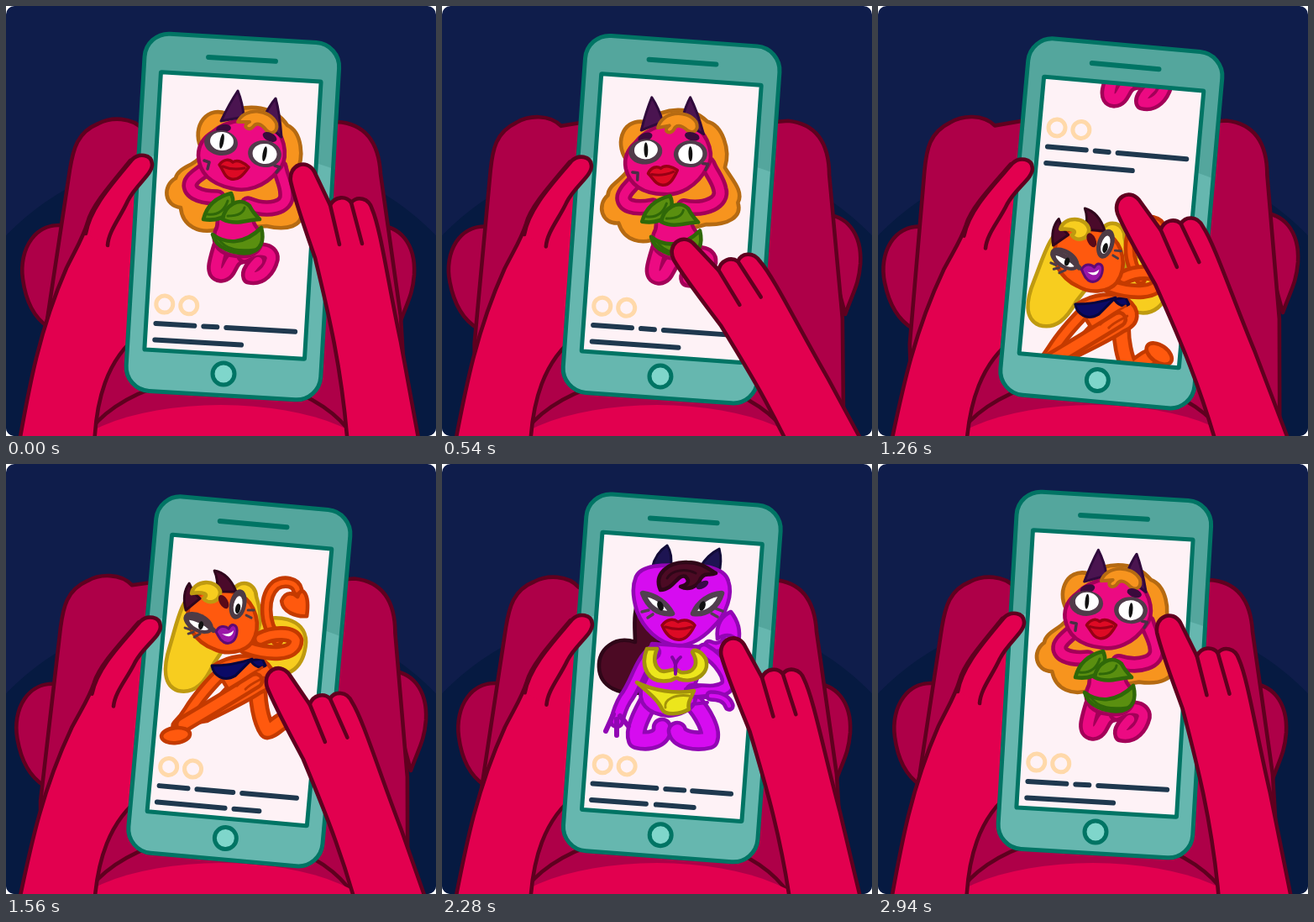
Write an HTML page with a canvas that moves like this. It is 512 px wide and 512 px high and loops after 3000 ms.

```html
<!DOCTYPE html>
<html>
<head>
<meta charset="utf-8">
<style>
html, body { margin: 0; width: 100%; height: 100%; overflow: hidden; background: #fff }
canvas { display: block }
</style>
</head>
<body>
<canvas id="stage" width="512" height="512"></canvas>
<script>
const c = document.getElementById('stage').getContext('2d');
const LOOP = 3000, PITCH = 332, TILT = 3.4;
const SKIN = '#e2004f', LEG = '#ae0048', INK = '#5f001f', TEAL = '#007464';

// drawing helpers
function shape(d, fill, line, w = 4.6) {
  const p = new Path2D(d);
  if (fill) { c.fillStyle = fill; c.fill(p); }
  if (line) { c.strokeStyle = line; c.lineWidth = w; c.stroke(p); }
}
function limb(d, w, fill, line) {
  shape(d, null, line, w + 4.6);
  shape(d, null, fill, w - 4.6);
}
function oval(x, y, rx, ry, rot, fill, line, w = 4.6) {
  c.beginPath();
  c.ellipse(x, y, rx, ry, rot * Math.PI / 180, 0, 7);
  if (fill) { c.fillStyle = fill; c.fill(); }
  if (line) { c.strokeStyle = line; c.lineWidth = w; c.stroke(); }
}
function box(x, y, w, h, r, fill, line, lw) {
  c.beginPath();
  c.roundRect(x, y, w, h, r);
  if (fill) { c.fillStyle = fill; c.fill(); }
  if (line) { c.strokeStyle = line; c.lineWidth = lw; c.stroke(); }
}
function turn(deg, x, y) {
  c.translate(x, y);
  c.rotate(deg * Math.PI / 180);
  c.translate(-x, -y);
}
function group(draw) { c.save(); draw(); c.restore(); }

// timing helpers
const ramp = (t, a, b) => {
  const k = Math.min(1, Math.max(0, (t - a) / (b - a)));
  return k * k * (3 - 2 * k);
};
const sway = t => Math.sin(2 * Math.PI * (t - 950) / 1000);

// time, turn, fingertip x, fingertip y
const HAND = [
  [0, 0, 352, 198], [540, -18, 285, 288], [960, -20, 268, 298], [1200, -12, 285, 240],
  [1400, -5, 335, 215], [1560, -9, 322, 253], [1760, -19, 270, 298], [1980, -14, 272, 235],
  [2130, -7, 318, 200], [2280, -3, 345, 217], [2500, -18, 285, 288], [2630, -18, 270, 288],
  [2790, -10, 290, 232], [2940, -1, 345, 190], [3000, 0, 352, 198]
];
function handAt(t) {
  const i = HAND.findIndex(k => k[0] > t), a = HAND[i - 1], b = HAND[i];
  const k = ramp(t, a[0], b[0]);
  return a.map((v, n) => v + (b[n] - v) * k);
}

function pinkGirl(t) {
  const P = '#ec0a82', D = '#a30058', H = '#f7941e', HD = '#b56a12', G = '#5a8f10', GD = '#2f6808';
  const head = draw => group(() => { turn(14 * sway(t) - 4.4, 284, 252); draw(); });
  head(() => shape('M262 128C235 118 220 150 234 172C232 190 205 190 202 205C186 214 188 238 208 240C210 262 230 272 252 266L310 262C335 268 354 262 352 244C362 232 350 215 345 200C356 180 352 150 335 142C320 120 290 115 262 128Z', H, HD));
  limb('M256 286C250 306 246 318 256 319C268 318 264 300 280 297', 17, P, D);
  limb('M284 297C300 288 317 290 316 301C313 313 304 325 290 322C288 317 294 310 300 304', 15, P, D);
  shape('M248 236L298 240C290 255 296 262 304 270C308 290 296 300 275 298C255 296 244 285 249 268C255 258 250 248 248 236Z', P, D);
  shape('M246 272C262 284 284 284 304 264C308 280 304 290 290 294C270 296 250 288 246 272Z', G, GD);
  shape('M252 276C262 292 280 292 296 290', null, GD, 3);
  head(() => {
    limb('M252 228C228 228 216 220 220 210C224 202 232 200 240 192', 15, P, D);
    limb('M288 236C312 246 336 240 334 224C334 212 328 204 326 192', 15, P, D);
    shape('M246 150C262 136 300 128 320 145C334 160 336 185 324 196C308 216 285 222 268 217C245 212 230 200 229 178C229 165 236 156 246 150Z', P, D);
    shape('M256 137Q266 116 276 101Q282 116 283 132Z', '#4a1450', '#30093c', 3);
    shape('M305 136Q314 118 321 110Q326 128 328 156Z', '#4a1450', '#30093c', 3);
    shape('M276 138C284 120 314 122 322 140C324 150 316 154 310 148C304 140 298 138 294 144C288 150 280 142 290 138Z', H, HD, 4);
    oval(259, 146, 9, 5, -10, '#3a0a3c');
    oval(314, 156, 9, 5, 25, '#3a0a3c');
    shape('M236 184L242 186L240 194M320 190L326 192L322 198', null, '#4a2d45', 3.5);
    oval(256, 163, 20, 15, 6, '#503b4a');
    oval(308, 176, 20, 16, 8, '#503b4a');
    oval(257, 161, 14, 11, 6, '#fff');
    oval(308, 176, 14.5, 12, 8, '#fff');
    oval(257, 161, 2.4, 9, 10, '#111');
    oval(308, 176, 2.4, 9, 10, '#111');
    shape('M254 189C259 182 266 182 270 186C276 182 284 187 289 192C282 202 276 208 268 206C260 204 259 196 254 189Z', '#dd0a24', '#970014', 3.5);
    shape('M258 191Q270 196 284 193', null, '#970014', 3);
  });
  shape('M235 254C240 234 256 226 268 223C276 240 262 258 235 254Z', G, GD);
  shape('M258 254C260 238 278 226 290 238C294 246 298 250 302 254C288 254 274 262 258 254Z', G, GD);
  shape('M240 248Q258 250 264 232M264 250Q282 250 284 240', null, GD, 3);
  // tinted bubble over the picture
  const grow = ramp(t, 640, 900), fade = 1 - ramp(t, 1020, 1160);
  if (grow && fade) {
    c.globalAlpha = .55 * fade;
    oval(274, 205, 76 * grow, 62 * grow, 0, '#4aa8e8');
    c.globalAlpha = 1;
  }
}

function orangeGirl(t) {
  const P = '#ff590e', D = '#c43a00', H = '#f7cd1f', HD = '#bf9a10', N = '#0b0a66';
  turn(-1.7, 10, 520);
  c.translate(1, 2);
  const head = draw => group(() => { turn(3 * (sway(t) + .64), 265, 228); draw(); });
  shape('M296 186C318 176 356 180 356 210C354 240 336 254 312 246C296 240 290 220 296 186Z', H, HD);
  head(() => {
    shape('M228 142C206 160 202 190 194 215C186 240 186 262 204 268C224 272 236 258 246 236L270 200Z', H, HD);
    shape('M268 150C276 134 296 138 297 156C302 172 306 190 292 208Z', H, HD);
  });
  limb('M322 208C304 186 306 154 320 142C330 136 344 138 346 148', 10, P, D);
  shape('M327 161C332 148 342 152 346 156C350 142 361 150 357 179C344 180 328 174 327 161Z', P, D);
  limb('M300 250C296 280 304 306 310 315C316 315 324 304 336 300', 18, P, D);
  oval(344, 297, 17, 10, 35, P, D);
  shape('M246 238C264 226 290 222 306 232C322 244 322 262 302 270C284 282 262 292 238 304L226 306C240 290 250 276 262 264Z', P, D);
  limb('M258 244C244 258 228 276 218 292C212 302 208 306 204 310', 13, P, D);
  limb('M296 256C270 272 244 288 210 308', 16, P, D);
  oval(201, 321, 17, 9, -6, P, D);
  shape('M244 238C246 250 258 258 272 250C278 244 284 238 292 230C280 234 266 238 244 238Z', N, '#06063f', 3);
  shape('M290 232C296 240 302 242 308 238L304 230Z', N, '#06063f', 3);
  limb('M284 216C312 226 344 226 344 208C340 198 318 198 302 206', 14, P, D);
  shape('M274 262C284 250 296 246 304 240M284 266C292 258 300 256 306 252', null, D, 3);
  head(() => {
    shape('M216 170C222 148 252 142 278 154C296 164 304 190 292 210C284 222 262 226 246 218C224 210 212 190 216 170Z', P, D);
    shape('M213 172Q208 152 217 140Q222 152 230 158Z', '#4a0a2a', '#30061c', 3);
    shape('M250 150Q252 136 247 125Q264 128 273 150Z', '#4a0a2a', '#30061c', 3);
    shape('M220 152C222 136 250 134 254 150C254 162 240 166 234 158C242 152 232 150 220 152Z', H, HD);
    oval(258, 162, 5, 9, -30, '#5a0a18');
    oval(228, 187, 19, 11, 27, '#4d3b45');
    oval(275, 165, 10, 18, 12, '#4d3b45');
    oval(229, 188, 13, 6, 27, '#fff');
    oval(275, 166, 5, 11, 12, '#fff');
    shape('M214 180Q232 182 246 196', null, '#4d3b45', 6);
    oval(231, 190, 3, 5, 10, '#111');
    oval(275, 170, 3, 6, 10, '#111');
    shape('M212 193L218 195M216 200L222 198M223 204L230 200M285 178L291 181M287 172L294 172', null, '#4d3b45', 3);
    shape('M249 198C252 190 260 190 264 194C268 186 274 190 274 196C274 208 266 214 258 210C252 206 252 202 249 198Z', '#9b16a8', '#5f0a72', 3);
    shape('M256 200Q264 202 270 196Q268 208 256 200Z', '#fff');
  });
}

function violetGirl(t) {
  const P = '#d60cf0', D = '#9206b4', H = '#4c0a24', HD = '#2f0618', Y = '#ece61c', YD = '#a3930a';
  turn(-.85, 10, 520);
  const head = draw => group(() => { turn(8 * (.88 - sway(t)), 280, 225); draw(); });
  shape('M238 150C226 176 230 196 230 212C206 204 186 220 187 242C188 266 212 276 240 272L262 220Z', H, HD);
  limb('M318 216C330 222 342 214 342 200', 10, P, D);
  shape('M328 208C326 190 334 180 344 176C352 186 356 198 353 212C346 202 338 202 328 208Z', P, D);
  limb('M250 276C236 300 228 318 232 328C248 332 264 326 262 314', 20, P, D);
  limb('M296 280C312 298 322 318 318 328C302 332 282 328 280 318', 20, P, D);
  shape('M250 214L312 218C316 240 302 252 300 268C306 282 300 296 270 300C244 298 232 284 238 264C250 252 244 232 250 214Z', P, D);
  limb('M252 224C236 236 232 262 218 280C212 290 210 298 208 306', 14, P, D);
  shape('M204 298L195 318M208 304L208 323M212 300L222 312', null, D, 6);
  limb('M312 222C330 232 348 256 338 266C326 274 312 270 298 270', 14, P, D);
  limb('M320 276C334 276 340 282 342 288', 9, P, D);
  shape('M290 268L308 264M292 278L314 276M298 286L316 284', null, D, 4);
  shape('M232 260C252 270 278 274 300 270C296 280 292 284 294 292C284 298 266 300 262 292C258 282 246 272 232 260Z', Y, YD);
  shape('M266 290C264 280 278 274 294 276', null, YD, 3);
  shape('M244 220C236 240 244 262 270 258C276 258 278 252 282 256C300 262 320 250 314 232C308 222 300 220 298 224C308 240 298 250 284 248C276 240 268 250 260 246C252 240 252 230 256 220Z', Y, YD);
  shape('M274 230Q280 238 278 250M284 230Q276 236 278 248', null, '#7f04a0', 4);
  head(() => {
    shape('M250 124Q254 106 268 97Q275 108 272 124Z', '#1d1452', '#120b38', 3);
    shape('M308 122Q316 108 330 101Q334 116 329 132Z', '#1d1452', '#120b38', 3);
    shape('M231 134C238 120 262 120 290 121C318 120 338 126 341 140C346 154 340 178 322 195C306 212 290 217 280 216C258 214 240 196 232 175C226 155 227 144 231 134Z', P, D);
    shape('M260 150C252 132 268 116 292 117C310 117 318 126 326 130C318 134 314 128 308 136C304 148 292 150 284 146C292 144 296 140 290 134C280 130 276 150 260 150Z', H, HD);
    shape('M268 136C274 126 290 124 302 130', null, HD, 3);
    oval(310, 144, 8, 4, -30, '#3a0a48');
    shape('M239 154C254 156 267 165 274 178C257 180 245 170 239 154Z', '#fff', '#51404f', 6.5);
    shape('M333 154C318 155 305 164 299 178C315 180 328 171 333 154Z', '#fff', '#51404f', 6.5);
    oval(260, 169, 3.5, 6, -20, '#111');
    oval(310, 169, 3.5, 6, 20, '#111');
    shape('M246 174L238 176M251 179L245 183M326 172L334 175M321 178L328 182', null, '#51404f', 3.5);
    shape('M262 192C268 184 276 184 281 188C288 184 296 186 301 192C294 206 288 210 280 209C272 208 266 202 262 192Z', '#dd0a24', '#970014', 3.5);
    shape('M266 194Q282 199 297 194', null, '#970014', 3);
  });
}

// each page: figure and caption dashes as [row, from, to]
const pages = [
  [pinkGirl, [[0, 7, 57], [0, 64, 84], [0, 91, 177], [1, 7, 114]]],
  [orangeGirl, [[0, 7, 45], [0, 52, 99], [0, 106, 175], [1, 6, 91], [1, 98, 132]]],
  [violetGirl, [[0, 6, 86], [0, 93, 119], [0, 125, 175], [1, 6, 75], [1, 83, 132]]]
];

function page(i, t) {
  const [figure, dashes] = pages[i % 3];
  group(() => figure(t));
  group(() => {
    c.translate(187, 82);
    c.rotate(TILT * Math.PI / 180);
    for (const x of [18, 47]) oval(x, 272.5, 10, 10, 0, null, '#ffd9aa', 5);
    for (const [row, a, b] of dashes) shape(`M${a + 2} ${296 + row * 19.5}H${b - 2}`, null, '#1f384e', 6);
  });
}

function legs(t) {
  const left = ramp(t, 0, 700) - ramp(t, 1200, 1950);
  const right = ramp(t, 0, 700) - ramp(t, 1570, 2270);
  group(() => {
    turn(-3.8 * left, 80, 512);
    shape('M72 262C35 255 15 290 20 325C24 355 35 372 50 382Z', LEG, INK);
    shape('M230 140L163 147C150 132 125 132 110 140C85 150 80 170 76 195L45 400L40 540H230Z', LEG, INK);
  });
  group(() => {
    c.translate(14 * right, -15 * right);
    shape('M436 262C470 258 488 285 486 320C484 345 478 352 468 380Z', LEG, INK);
  });
  group(() => {
    turn(3.2 * right, 430, 512);
    shape('M300 150L394 138C430 140 444 165 446 200L470 370L480 540H300Z', LEG, INK);
  });
  oval(254, 562, 175, 120, 0, LEG, INK);
  oval(256, 560, 200, 85, 0, SKIN);
}

const glow = fill => oval(256, 450, 330, 280, 0, fill);
const phoneBox = (fill, line) => box(154, 38, 232, 426, 29, fill, line, 5);
const SCREEN = [174.5, 84, 191, 331, 1];

function phone(t) {
  turn(1.72 * (ramp(t, 0, 1250) - ramp(t, 1600, 2950)), 10, 520);
  shape('M14 530C28 450 40 385 72 312C86 284 92 275 97 258C102 238 125 212 148 184L172 200L160 390C120 420 106 470 105 530Z', SKIN, INK);
  group(() => {
    turn(TILT, 270, 249);
    phoneBox('#54a69d');
    group(() => {
      c.clip();
      turn(-TILT, 270, 249);
      glow('#66b7af');
    });
    phoneBox(null, TEAL);
    box(...SCREEN, '#fef2f6');
  });
  group(() => {
    turn(TILT, 270, 249);
    box(...SCREEN);
    c.clip();
    turn(-TILT, 270, 249);
    const scroll = ramp(t, 1050, 1400) + ramp(t, 1830, 2130) + ramp(t, 2520, 2850);
    const a = TILT * Math.PI / 180;
    for (let i = 0; i < 4; i++) {
      const y = (i - scroll) * PITCH;
      if (Math.abs(y) >= PITCH) continue;
      group(() => {
        c.translate(-Math.sin(a) * y, Math.cos(a) * y);
        page(i, t);
      });
    }
  });
  group(() => {
    turn(TILT, 270, 249);
    box(...SCREEN, null, TEAL, 5);
    shape('M230 63H310', null, TEAL, 6);
  });
  oval(259, 438, 13, 13, 0, '#7fd6cb', TEAL, 5);
  shape('M95 271C100 240 128 210 150 183C158 175 173 176 174 188C175 200 155 212 145 232C136 252 122 268 121 285', SKIN, INK);
}

function rightHand(t) {
  const [, rot, x, y] = handAt(t);
  c.translate(x - 352, y - 198);
  turn(rot, 352, 198);
  shape('M418 680L406 512C399 430 385 370 368 300C355 262 345 235 339 209C336 189 358 181 367 197L386 237C392 226 405 226 411 234C418 226 432 228 436 242C446 265 455 330 470 400L492 520L522 680Z', SKIN, INK);
  shape('M386 237L397 284M411 234L424 283', null, INK);
}

function frame(now) {
  const t = now % LOOP;
  c.clearRect(0, 0, 512, 512);
  c.lineCap = c.lineJoin = 'round';
  group(() => {
    box(0, 0, 512, 512, 10, '#0f1d4b');
    c.clip();
    glow('#061a41');
    legs(t);
    group(() => phone(t));
    group(() => rightHand(t));
  });
  requestAnimationFrame(frame);
}
requestAnimationFrame(frame);
</script>
</body>
</html>
```
